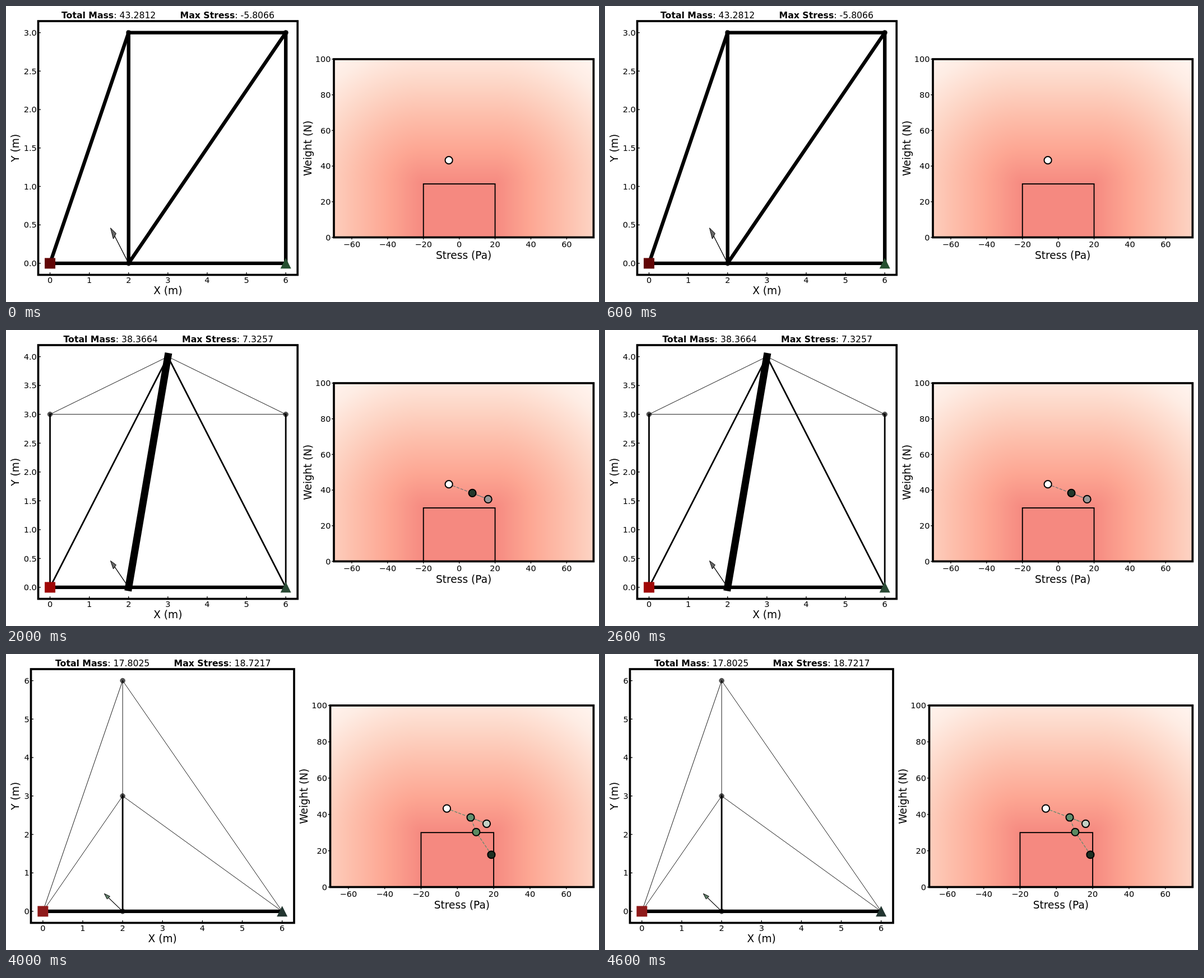
An HTML page with a canvas for the animation above (5 s loop, 1058 px wide and 529 px high).

```html
<!DOCTYPE html>
<html lang="en">
<head>
<meta charset="utf-8">
<title>Truss design steps</title>
<style>
  html, body { margin: 0; width: 100%; height: 100%; overflow: hidden; background: #fff; }
  canvas, svg { position: absolute; left: 0; top: 0; }
  text { font-family: "DejaVu Sans", sans-serif; font-size: 14.5px; }
  .label { font-size: 18.6px; text-anchor: middle; }
  .title { font-size: 15.7px; }
  .title tspan { font-weight: bold; }
</style>
</head>
<body>
<canvas id="field" width="1058" height="529"></canvas>
<svg id="plot" width="1058" height="529" viewBox="0 0 1058 529"></svg>
<script>
const STEP = 1000;
const HAIR = 0.9, SLIM = 2.8, WIDE = 6.4, HEAVY = 13;
const svg = document.getElementById("plot");
const ctx = document.getElementById("field").getContext("2d");

// Panel boxes in pixels: left, top, right, bottom
const trussBox = [57.5, 27, 520.2, 480.5], trussBoxWide = [44.5, 27, 514, 480.5];
const stressBox = [585, 95, 1048.3, 413.5], stressBoxWide = [578.5, 92, 1048.3, 416.5];

// Members are [x1, y1, x2, y2, width]
const base = [[0, 0, 2, 0, WIDE], [2, 0, 6, 0, WIDE]];
const house = apex => [
  ...base,
  [0, 0, 0, 3, SLIM], [6, 0, 6, 3, SLIM], [0, 3, 6, 3, HAIR],
  [0, 3, 3, apex, HAIR], [3, apex, 6, 3, HAIR],
  [0, 0, 3, apex, SLIM], [3, apex, 6, 0, SLIM], [2, 0, 3, apex, HEAVY]
];

const scenes = [
  {
    mass: 43.2812, stress: -5.8066, titleX: 99, height: 3, pin: "#620505", roller: "#265030",
    nodes: [[2, 0], [2, 3], [6, 3]], dots: ["#fff"],
    members: [...base, [0, 0, 2, 3, WIDE], [2, 0, 2, 3, WIDE], [2, 3, 6, 3, WIDE],
              [2, 0, 6, 3, WIDE], [6, 0, 6, 3, WIDE]]
  },
  {
    mass: 34.8755, stress: 16.1164, titleX: 96.5, height: 3, pin: "#a40202", roller: "#24502e",
    nodes: [[0, 3]], dots: ["#fff", "#24482f"],
    members: [...base, [0, 0, 0, 3, SLIM], [0, 3, 2, 0, SLIM], [0, 3, 6, 3, HAIR],
              [6, 0, 6, 3, SLIM], [2, 0, 6, 3, HEAVY]]
  },
  {
    mass: 38.3664, stress: 7.3257, titleX: 102.5, height: 4, pin: "#a00605", roller: "#2a4a35",
    nodes: [[0, 3], [6, 3]], dots: ["#fff", "#999", "#22382c"], members: house(4)
  },
  {
    mass: 30.2828, stress: 10.3607, titleX: 97, height: 3, pin: "#a80a0a", roller: "#2a4f35",
    nodes: [[0, 3], [6, 3]], dots: ["#fff", "#c0c0c0", "#4f6658", "#24402f"], members: house(2)
  },
  {
    mass: 17.8025, stress: 18.7217, titleX: 88, height: 6, pin: "#8f1a1a", roller: "#223530", wide: true,
    nodes: [[2, 0], [2, 3], [2, 6]], dots: ["#fff", "#c4d0c4", "#5f8f6f", "#5a8a62", "#1c3022"],
    members: [...base, [0, 0, 2, 6, HAIR], [2, 6, 6, 0, HAIR], [2, 3, 2, 6, HAIR],
              [0, 0, 2, 3, HAIR], [2, 3, 6, 0, HAIR], [2, 0, 2, 3, SLIM]]
  }
];

const scale = (d0, d1, p0, p1) => v => p0 + (v - d0) / (d1 - d0) * (p1 - p0);
const line = (x1, y1, x2, y2, w, extra = "") =>
  `<path d="M${x1} ${y1}L${x2} ${y2}" stroke="#000" stroke-width="${w}" ${extra}/>`;
const circle = (x, y, r, fill, w) =>
  `<circle cx="${x}" cy="${y}" r="${r}" fill="${fill}" stroke="#000" stroke-width="${w}"/>`;
const polygon = (points, fill, w = 0) =>
  `<polygon points="${points.join(" ")}" fill="${fill}" stroke="#000" stroke-width="${w}"/>`;
const text = (x, y, s, attrs) => `<text x="${x}" y="${y}" ${attrs}>${s}</text>`;
const rect = (x0, y0, x1, y1, w) =>
  `<rect x="${x0}" y="${y0}" width="${x1 - x0}" height="${y1 - y0}" fill="none" stroke="#000" stroke-width="${w}"/>`;
const range = (from, to, step) =>
  Array.from({ length: Math.round((to - from) / step) + 1 }, (_, i) => from + i * step);
const signed = v => String(v).replace("-", "\u2212");

function xLabel([x0, , x1], y, s) {
  return text((x0 + x1) / 2, y, s, 'class="label"');
}

function yLabel(x, [, y0, , y1], s) {
  return text(0, 0, s, `class="label" transform="translate(${x} ${(y0 + y1) / 2}) rotate(-90)"`);
}

function xTicks(values, X, y, tick, baseline) {
  return values.map(v => line(X(v), y, X(v), y + tick, 1.3) +
    text(X(v), baseline, signed(v), 'text-anchor="middle"')).join("");
}

function yTicks(values, Y, x, tick, edge, digits) {
  return values.map(v => line(x, Y(v), x + tick, Y(v), 1.3) +
    text(edge, Y(v) + 5.3, v.toFixed(digits), 'text-anchor="end"')).join("");
}

function loadArrow(X, Y, fill) {
  // Built in data units, so it skews with the axes
  const at = (along, side) => {
    const k = Math.SQRT1_2;
    return [X(2 + (side - along) * k), Y((along + side) * k)];
  };
  return line(...at(0, 0), ...at(0.5, 0), 1.3) +
    polygon([at(0.65, 0), at(0.5, 0.05), at(0.5, -0.05)], fill, 1);
}

function trussPanel(s) {
  const box = s.wide ? trussBoxWide : trussBox;
  const [x0, y0, x1, y1] = box;
  const X = scale(-0.3, 6.3, x0, x1);
  const Y = scale(-0.05 * s.height, 1.05 * s.height, y1, y0);
  const px = X(0), rx = X(6), ground = Y(0);
  const title = (x, name, value) =>
    text(x, 22, `<tspan>${name}</tspan>: ${value.toFixed(4)}`, 'class="title"');
  return xTicks(range(0, 6, 1), X, y1, -4.5, 495) +
    yTicks(range(0, s.height, s.wide ? 1 : 0.5), Y, x0, 4.5, x0 - 2.7, s.wide ? 0 : 1) +
    s.members.map(([a, b, c, d, w]) =>
      line(X(a), Y(b), X(c), Y(d), w, 'stroke-linecap="square"')).join("") +
    s.nodes.map(([a, b]) => `<g opacity=".68">${circle(X(a), Y(b), 4.3, "#000", 1)}</g>`).join("") +
    loadArrow(X, Y, s.wide ? "#5f7f68" : "#666") +
    polygon([[px - 9.5, ground - 9.5], [px + 9.5, ground - 9.5],
             [px + 9.5, ground + 9.5], [px - 9.5, ground + 9.5]], s.pin) +
    polygon([[rx, ground - 9.7], [rx + 9.5, ground + 9.3], [rx - 9.5, ground + 9.3]], s.roller) +
    rect(...box, 3.7) +
    title(s.titleX, "Total Mass", s.mass) + title(s.titleX + 211.6, "Max Stress", s.stress) +
    xLabel(box, 515, "X (m)") + yLabel(23.3, box, "Y (m)");
}

function stressPanel(s) {
  const box = s.wide ? stressBoxWide : stressBox;
  const [x0, y0, x1, y1] = box;
  const X = scale(-70, 75, x0, x1), Y = scale(0, 100, y1, y0);
  const points = s.dots.map((_, i) => [X(scenes[i].stress), Y(scenes[i].mass)]);
  paintField(box);
  return xTicks(range(-60, 60, 20), X, y1, 3.8, y1 + 17.7) +
    yTicks(range(0, 100, 20), Y, x0, -3.8, x0 - 5.5, 0) +
    rect(X(-20), Y(30), X(20), Y(0), 1.9) +
    `<polyline points="${points.join(" ")}" fill="none" stroke="${s.wide ? "#6a8a70" : "#777"}" ` +
    `stroke-width="1.4" stroke-dasharray="5.2 2.2"/>` +
    points.map(([x, y], i) => circle(x, y, 6.6, s.dots[i], 2)).join("") +
    rect(...box, 3.7) +
    xLabel(box, y1 + 38.7, "Stress (Pa)") + yLabel(x0 - 40.3, box, "Weight (N)");
}

// Shade by distance from the feasible region
const reds = [[255, 245, 240], [254, 224, 210], [252, 187, 161],
              [252, 146, 114], [251, 106, 74], [239, 59, 44]];

function paintField([x0, y0, x1, y1]) {
  const w = Math.round(x1 - x0), h = Math.round(y1 - y0);
  const image = ctx.createImageData(w, h);
  for (let y = 0, k = 0; y < h; y++) {
    const dy = Math.max(0, 70 - 100 * (y + 0.5) / h);
    for (let x = 0; x < w; x++) {
      const dx = Math.max(0, Math.abs(145 * (x + 0.5) / w - 70) - 20);
      const t = 5 * (1 - Math.hypot(dx, dy) / 95);
      const i = Math.min(4, Math.floor(t));
      for (let c = 0; c < 3; c++) {
        const tone = reds[i][c] + (reds[i + 1][c] - reds[i][c]) * (t - i);
        image.data[k++] = 255 - 0.6 * (255 - tone);
      }
      image.data[k++] = 255;
    }
  }
  ctx.clearRect(0, 0, 1058, 529);
  ctx.putImageData(image, Math.round(x0), Math.round(y0));
}

let shown = -1;
function render() {
  const index = Math.floor(performance.now() / STEP) % scenes.length;
  if (index !== shown) {
    shown = index;
    svg.innerHTML = trussPanel(scenes[index]) + stressPanel(scenes[index]);
  }
  requestAnimationFrame(render);
}
render();
</script>
</body>
</html>
```
